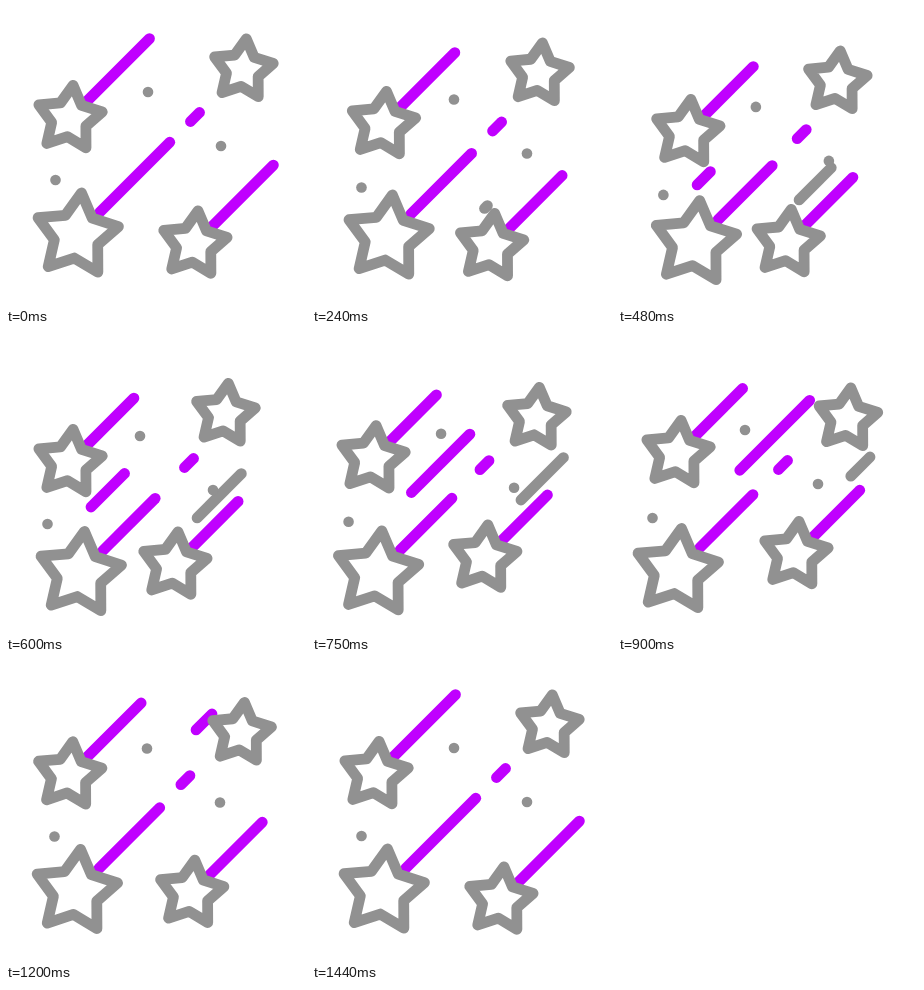
These frames come from a looping animation (300 by 300 pixels, 1.5 s). An HTML page with a canvas:

```html
<!DOCTYPE html>
<html lang="en">
<head>
<meta charset="utf-8">
<title>Shooting stars</title>
<style>
  html, body { margin: 0; overflow: hidden; background: #fff; }
  canvas { display: block; width: 100vmin; height: 100vmin; }
</style>
</head>
<body>
<canvas id="stage" width="300" height="300"></canvas>
<script>
const ctx = document.getElementById('stage').getContext('2d');
const LOOP = 1500, STEP = 30, LAST = 1440;
const GREY = '#919191', PURPLE = '#c000ff';

const clamp = u => Math.min(Math.max(u, 0), 1);
const progress = (t, from, to) => clamp((t - from) / (to - from));
const smooth = u => u * u * (3 - 2 * u);

// Smooth curve through (times, values), at rest at both ends
function curve(times, values, t) {
  const n = times.length - 1;
  if (t >= times[n]) return values[n];
  const i = times.findIndex(k => k > t) - 1;
  const slope = k => k === 0 || k === n ? 0
    : (values[k + 1] - values[k - 1]) / (times[k + 1] - times[k - 1]);
  const d = times[i + 1] - times[i], u = (t - times[i]) / d, v = 1 - u;
  return values[i] + (values[i + 1] - values[i]) * smooth(u)
    + d * u * v * (slope(i) * v - slope(i + 1) * u);
}

// Wander from home past three offsets and return at time `back`
const wander = (home, back, ...stops) => t => home.map((h, axis) =>
  h + curve([0, 360, 600, 900, back], [0, ...stops.map(s => s[axis]), 0], t));

const SOON = 1260;
const stars = [
  { at: wander([63.4, 112.7], SOON, [10, 10], [0, 16], [-4, 7]), radius: 33.5, tail: 62 },
  { at: wander([70.8, 229.2], SOON, [7, 4], [3, 10.5], [-12, 7.5]), radius: 42.5, tail: 70 },
  { at: wander([188.3, 238.2], LAST, [-15, 2.5], [-20, -7], [-11, -17.5]), radius: 33.5, tail: 61 },
  { at: wander([236.9, 63.7], LAST, [-15.5, 7.5], [-18, 16.5], [-7.5, 21]), radius: 31, tail: 0 }
];
const dash = wander([184.5, 115.5], LAST, [-6, 15], [-6, 18], [-24, 20]);
const dots = [[142, 86], [215, 140], [49.5, 174]].map(home =>
  wander(home, SOON, [-1, 12], [-8, 16], [-15, 10]));

const streaks = [
  { color: PURPLE, x: 78, y: 180, reach: 128, head: [330, 1050], foot: [400, 1255] },
  { color: GREY, x: 172.5, y: 202.5, reach: 79.5, head: [170, 780], foot: [225, 1000] }
];

// Every line rises to the right at 45 degrees
function diagonal(x, y, length, color) {
  ctx.strokeStyle = color;
  ctx.beginPath();
  ctx.moveTo(x, y);
  ctx.lineTo(x + length, y - length);
  ctx.stroke();
}

function drawStreak({ color, x, y, reach, head, foot }, t) {
  if (t < head[0] || t >= foot[1]) return;
  const near = reach * progress(t, ...foot) ** 2;
  const far = reach * smooth(progress(t, ...head));
  diagonal(x + near, y - near, far - near + 0.01, color);
}

function drawTail({ at, radius, tail }, t) {
  const [x, y] = at(t), gap = radius * 0.54;
  const length = tail * (1 - 0.26 * Math.sin(Math.PI * t / LAST));
  diagonal(x + gap, y - gap, length, PURPLE);
}

function drawStar({ at, radius }, t) {
  const [x, y] = at(t);
  ctx.strokeStyle = GREY;
  ctx.beginPath();
  for (let i = 0; i < 10; i++) {
    const a = i * Math.PI / 5 + 0.11, r = i % 2 ? radius * 0.54 : radius;
    ctx.lineTo(x + r * Math.sin(a), y - r * Math.cos(a));
  }
  ctx.closePath();
  ctx.stroke();
}

function drawDot(at, t) {
  ctx.beginPath();
  ctx.arc(...at(t), 5.3, 0, 2 * Math.PI);
  ctx.fill();
}

function draw(t) {
  ctx.fillStyle = '#fff';
  ctx.fillRect(0, 0, 300, 300);
  ctx.fillStyle = GREY;
  ctx.lineWidth = 10.8;
  ctx.lineCap = ctx.lineJoin = 'round';
  streaks.forEach(s => drawStreak(s, t));
  stars.filter(s => s.tail).forEach(s => drawTail(s, t));
  stars.forEach(s => drawStar(s, t));
  diagonal(...dash(t), 9, PURPLE);
  dots.forEach(d => drawDot(d, t));
}

const start = performance.now();
function tick() {
  const t = Math.floor((performance.now() - start) % LOOP / STEP) * STEP;
  draw(t < 2 * STEP ? 0 : Math.min(t, LAST));
  requestAnimationFrame(tick);
}
tick();
</script>
</body>
</html>
```
